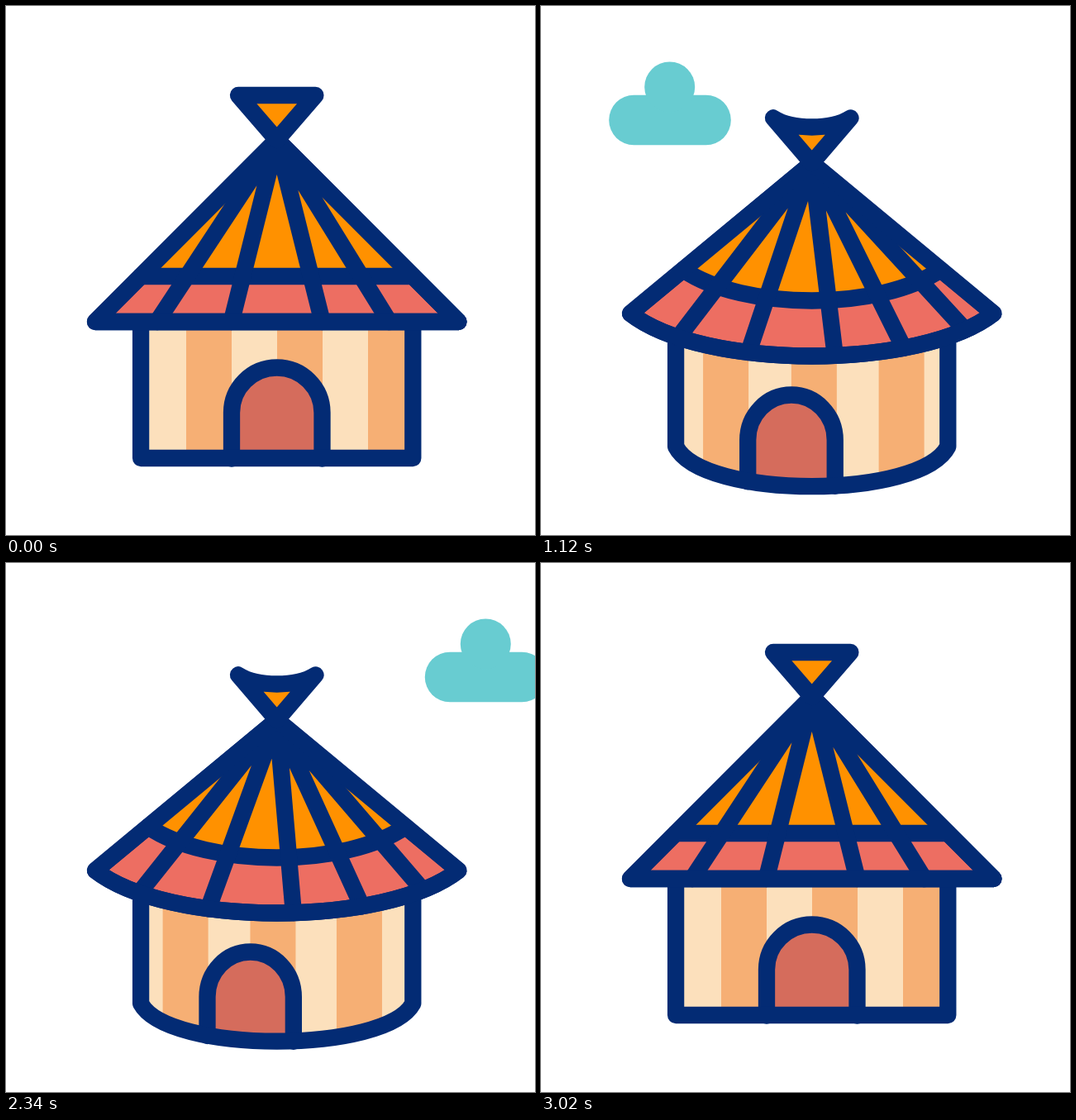
An HTML page with a canvas that plays this animation: 640x640 px, repeating every 3.4 s.

```html
<!DOCTYPE html>
<html lang="en">
<head>
<meta charset="utf-8">
<title>Hut and cloud</title>
<style>
html, body { margin: 0; width: 100%; height: 100%; overflow: hidden; background: #fff; }
canvas { display: block; width: 640px; height: 640px; }
</style>
</head>
<body>
<canvas id="stage" width="640" height="640"></canvas>
<script>
const ctx = document.getElementById('stage').getContext('2d');
const LOOP = 3400, CX = 327.7;
const NAVY = '#032b74', ORANGE = '#ff9100', PINK = '#ed6e62', CREAM = '#fce0bc',
      TAN = '#f6af74', DOOR = '#d56c5c', CLOUD = '#68ccd1';

const clamp = v => Math.max(0, Math.min(1, v));
const span = (t, a, b) => clamp((t - a) / (b - a));
const mix = (a, b, p) => a + (b - a) * p;
const cubicInOut = u => u < .5 ? 4 * u ** 3 : 1 - (2 - 2 * u) ** 3 / 2;

// How far the flat hut has tilted into its round form, 0 to 1
function tiltAt(t) {
  return t < 1500 ? span(t, 220, 730) : (1 - span(t, 2390, 3020)) ** 1.4;
}

// Sideways travel of the hut's front, in pixels
function turnAt(t) {
  if (t < 1770) return 46 * span(t, 355, 1770);
  if (t < 2380) return mix(46, 31.3, span(t, 1770, 2380));
  return 31.3 * (1 - cubicInOut(span(t, 2380, 3020)));
}

// A symmetric sagging curve; k sets how full its shoulders are
function sag(half, y, depth, k) {
  const low = y + depth * 4 / 3;
  return {
    half, y,
    trace() {
      ctx.bezierCurveTo(CX - k * half, low, CX + k * half, low, CX + half, y);
    },
    at(x) {
      let lo = 0, hi = 1;
      for (let i = 0; i < 24; i++) {
        const m = (lo + hi) / 2, n = 1 - m;
        const d = half * (m ** 3 - n ** 3) + 3 * k * half * m * n * (m - n);
        if (CX + d < x) lo = m; else hi = m;
      }
      return y + 4 * depth * lo * (1 - lo);
    }
  };
}

function startAt(curve) {
  ctx.beginPath();
  ctx.moveTo(CX - curve.half, curve.y);
  curve.trace();
}

function fill(color) {
  ctx.fillStyle = color;
  ctx.fill();
}

function drawCloud(t) {
  const x = -29.5 + .348 * (t - 800);
  if (x < -150 || x > 640) return;
  ctx.beginPath();
  ctx.roundRect(x, 107.7, 147.6, 60.6, 30.3);
  fill(CLOUD);
  ctx.beginPath();
  ctx.arc(x + 73.5, 98, 30.5, 0, 7);
  fill(CLOUD);
}

function drawWall(t, p, s) {
  const ends = mix(547, 533, p);
  const low = 547 + p * mix(35, 31.5, span(t, 720, 2400));
  const base = sag(164.6, ends, low - ends, .8);
  const outline = () => {
    startAt(base);
    ctx.lineTo(CX + base.half, 382);
    ctx.lineTo(CX - base.half, 382);
    ctx.closePath();
  };

  ctx.save();
  outline();
  fill(CREAM);
  ctx.clip();
  ctx.fillStyle = TAN;
  [.88, 1.01, 1.18].forEach((rate, i) => {
    ctx.fillRect(218 + 110 * i - rate * s, 370, 55, 240);
  });
  ctx.restore();

  const left = 273 - .915 * s, right = 382.5 - 1.075 * s;
  const top = mix(437.5, 470.5, p), rx = (right - left) / 2;
  ctx.beginPath();
  ctx.moveTo(left, base.at(left) + .5);
  ctx.lineTo(left, top + 54.5);
  ctx.ellipse((left + right) / 2, top + 54.5, rx, 54.5, 0, Math.PI, 2 * Math.PI);
  ctx.lineTo(right, base.at(right) + .5);
  fill(DOOR);
  ctx.stroke();
  outline();
  ctx.stroke();
}

function drawRoof(p, s) {
  const apex = mix(162, 190, p), corner = mix(382, 372, p);
  const eave = sag(219.7, corner, mix(382, 423.5, p) - corner, .6);
  const bandY = mix(327, 319, p);
  const band = sag(164.7 - 9 * p * p, bandY, mix(327, 356.5, p) - bandY, .53);
  const cone = curve => {
    startAt(curve);
    ctx.lineTo(CX, apex);
    ctx.closePath();
  };

  cone(eave);
  fill(PINK);
  ctx.stroke();
  cone(band);
  fill(ORANGE);
  startAt(band);
  ctx.stroke();

  const ribs = [
    -145 - .67 * s,
    -55 - .87 * s,
    55 - 1.08 * s,
    136 - .9 * s - .004 * s * s,
    219.7 - 1.5 * s + .005 * s * s
  ];
  ctx.beginPath();
  for (const d of ribs) {
    ctx.moveTo(CX, apex);
    ctx.lineTo(CX + d, eave.at(CX + d));
  }
  ctx.stroke();
  cone(eave);
  ctx.stroke();

  const crown = sag(46.7, mix(108, 135.5, p), 11 * p, .5);
  cone(crown);
  fill(ORANGE);
  ctx.stroke();
}

function draw(t) {
  const p = tiltAt(t), s = turnAt(t);
  ctx.fillStyle = '#fff';
  ctx.fillRect(0, 0, 640, 640);
  ctx.strokeStyle = NAVY;
  ctx.lineWidth = 20.3;
  ctx.lineCap = ctx.lineJoin = 'round';
  drawCloud(t);
  drawWall(t, p, s);
  drawRoof(p, s);
}

const begin = performance.now();
function tick() {
  draw((performance.now() - begin) % LOOP);
  requestAnimationFrame(tick);
}
tick();
</script>
</body>
</html>
```
